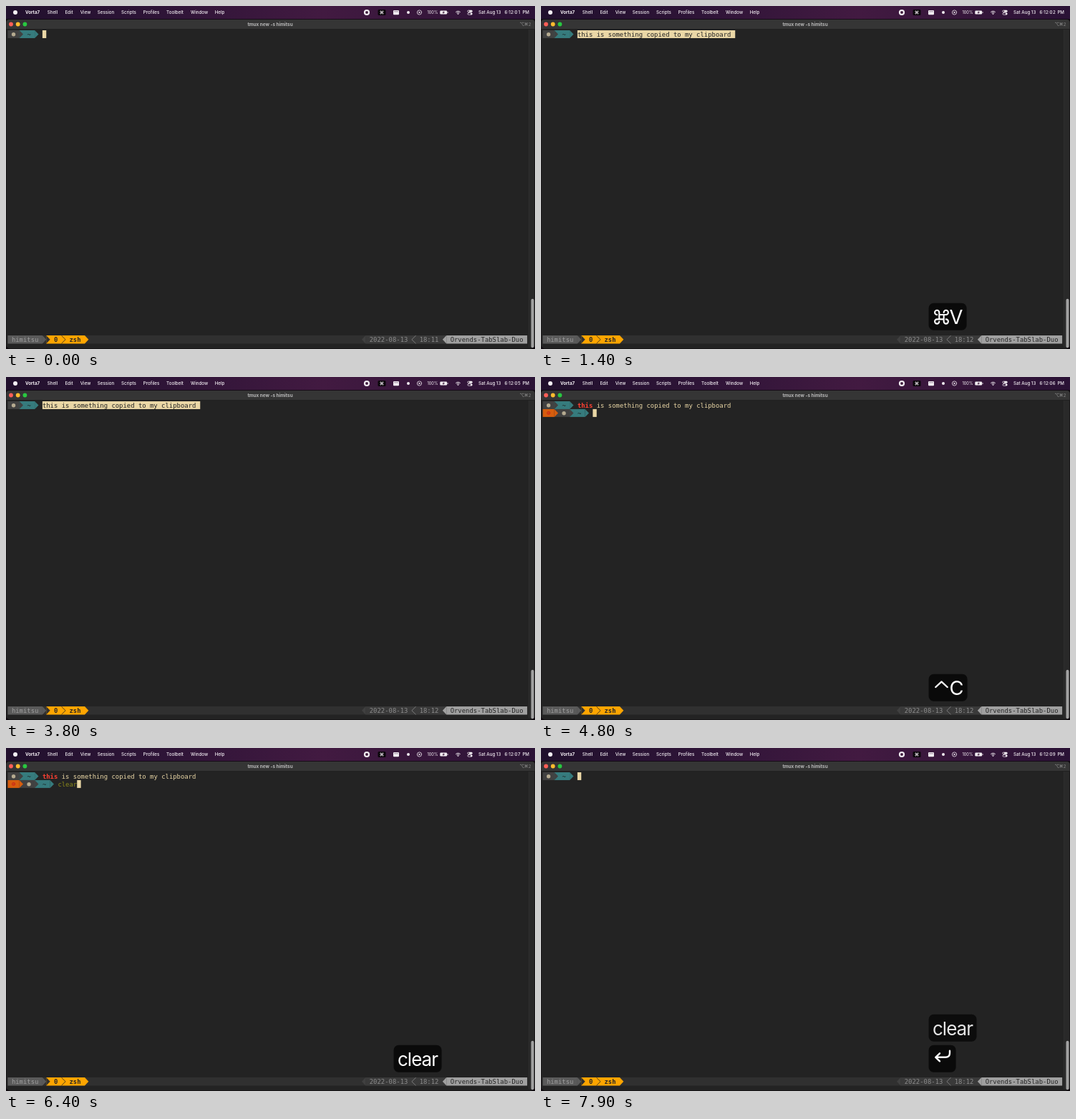
Recreate the animation shown at these times as an HTML page with a canvas. Size 739 by 480 pixels, loop 8 s.

```html
<!DOCTYPE html>
<html lang="en">
<head>
<meta charset="utf-8">
<title>Terminal paste</title>
<style>
html, body { margin: 0; width: 100%; height: 100%; overflow: hidden; background: #000; }
canvas { display: block; width: 739px; height: 480px; }
</style>
</head>
<body>
<canvas id="stage"></canvas>
<script>
const W = 739, H = 480, LOOP = 8000;
const canvas = document.getElementById('stage');
const ctx = canvas.getContext('2d');
const dpr = window.devicePixelRatio || 1;
canvas.width = W * dpr;
canvas.height = H * dpr;

const SANS = 'Inter, sans-serif';
const MONO = '8.928px "DejaVu Sans Mono", monospace';
const LEFT = 2.5, CELL = 5.375, ROW = 10.95, TOP = 34;
const STATUS = 461, STATUS_H = 11.5;
const CREAM = '#ead7a6', DARK = '#232323', GREY = '#414141', TEAL = '#367b7d';
const ORANGE = '#d65d0e', RED = '#ff4032', OLIVE = '#8a891a';
const AMBER = '#ffa500', BAR = '#303030';

const PASTE = 'this is something copied to my clipboard';
const PASTE_AT = 1400, CANCEL_AT = 4000, ENTER_AT = 7400;
const TYPE_AT = 5300, TYPE_STEP = 210, HOLD = 1740, FADE = 200;
const CMD = 'clear';

const keys = [
  { start: PASTE_AT, last: PASTE_AT, kind: 'cmd', text: 'V', width: 53 },
  { start: CANCEL_AT, last: CANCEL_AT, kind: 'ctrl', text: 'C', width: 54 },
  { start: TYPE_AT, last: TYPE_AT + 4 * TYPE_STEP, kind: 'typed' },
  { start: ENTER_AT, last: ENTER_AT, kind: 'enter', width: 38 }
];
const menu = [['Shell', 65], ['Edit', 88], ['View', 111], ['Session', 139.5], ['Scripts', 171.5],
  ['Profiles', 203], ['Toolbelt', 236], ['Window', 270], ['Help', 298.5]];

const col = n => LEFT + n * CELL;

function rect(x, y, w, h, fill) {
  ctx.fillStyle = fill;
  ctx.fillRect(x, y, w, h);
}

function round(x, y, w, h, r, fill) {
  ctx.fillStyle = fill;
  ctx.beginPath();
  ctx.roundRect(x, y, w, h, r);
  ctx.fill();
}

function disc(x, y, r, fill) {
  ctx.fillStyle = fill;
  ctx.beginPath();
  ctx.arc(x, y, r, 0, 7);
  ctx.fill();
}

function poly(points, fill) {
  ctx.fillStyle = fill;
  ctx.beginPath();
  points.forEach(p => ctx.lineTo(p[0], p[1]));
  ctx.fill();
}

function line(points, color, width) {
  ctx.strokeStyle = color;
  ctx.lineWidth = width;
  ctx.beginPath();
  points.forEach(p => ctx.lineTo(p[0], p[1]));
  ctx.stroke();
}

function label(str, x, y, font, fill, align = 'left') {
  ctx.font = font;
  ctx.fillStyle = fill;
  ctx.textAlign = align;
  ctx.fillText(str, x, y);
}

function mono(str, n, y, fill, bold) {
  label(str, col(n), y, (bold ? 'bold ' : '') + MONO, fill);
}

// Powerline arrow filling one cell; dir is 1 for right, -1 for left.
function arrow(n, y, h, fill, dir = 1) {
  const a = col(dir > 0 ? n : n + 1), b = a + dir * CELL;
  poly([[a, y], [b, y + h / 2], [a, y + h]], fill);
}

function chevron(n, color, dir) {
  const a = col(dir > 0 ? n : n + 1), b = a + dir * CELL;
  line([[a, STATUS + .5], [b, STATUS + STATUS_H / 2], [a, STATUS + STATUS_H - .5]], color, .8);
}

function looped(x, y, s, color, width) {
  const a = s * .34, r = s * .33, P = Math.PI;
  ctx.strokeStyle = color;
  ctx.lineWidth = width;
  ctx.beginPath();
  ctx.rect(x - a, y - a, 2 * a, 2 * a);
  for (const [sx, sy, from] of [[-1, -1, .5], [1, -1, 1], [1, 1, 1.5], [-1, 1, 0]]) {
    const cx = x + sx * (a + r), cy = y + sy * (a + r), f = from * P;
    ctx.moveTo(cx + r * Math.cos(f), cy + r * Math.sin(f));
    ctx.arc(cx, cy, r, f, f + 1.5 * P);
    ctx.lineTo(x + sx * a, y + sy * a);
  }
  ctx.stroke();
}

function menuIcons() {
  const w = '#f2edf2', bg = '#3a1838';
  disc(504, 9, 4.1, w);
  round(502.3, 7.3, 3.4, 3.4, 1, bg);
  round(519.5, 5, 11, 8, 1.5, '#0b060b');
  looped(525, 9, 2.2, w, .7);
  round(541, 6, 8, 6.2, 1, w);
  rect(542, 7.4, 6, .8, '#8a738a');
  disc(562, 9, 2, w);
  ctx.strokeStyle = w;
  ctx.lineWidth = .8;
  ctx.beginPath();
  ctx.arc(577.5, 9, 3.1, 0, 7);
  ctx.stroke();
  poly([[576.6, 7.5], [579.2, 9], [576.6, 10.5]], w);
  label('100%', 603.5, 11, '5.7px ' + SANS, w, 'right');
  round(606.3, 6.5, 9.8, 5, 1.2, w);
  rect(616.6, 8, .8, 2, w);
  poly([[611.8, 6.9], [609.3, 9.4], [611, 9.4], [610.5, 11.2], [613.1, 8.6], [611.3, 8.6]], bg);
  ctx.lineWidth = 1;
  for (const r of [2.4, 4.2]) {
    ctx.beginPath();
    ctx.arc(631.5, 11.3, r, -2.35, -.79);
    ctx.stroke();
  }
  disc(631.5, 11.1, .9, w);
  round(644.6, 5.8, 7, 2.9, 1.4, w);
  disc(646.2, 7.25, .9, bg);
  ctx.lineWidth = .7;
  ctx.beginPath();
  ctx.roundRect(644.9, 9.6, 6.4, 2.6, 1.3);
  ctx.stroke();
  disc(650, 10.9, 1.2, w);
}

function menuBar(t) {
  const g = ctx.createLinearGradient(0, 0, W, 0);
  g.addColorStop(0, '#21102d');
  g.addColorStop(.3, '#2e1437');
  g.addColorStop(.6, '#421a41');
  g.addColorStop(1, '#2a1235');
  rect(0, 0, W, 18.2, g);
  const font = '500 6.2px ' + SANS, w = '#f5f0f5';
  disc(13, 9, 3, w);
  label('Vorta7', 37, 11.2, 'bold 6.2px ' + SANS, w, 'center');
  menu.forEach(([name, x]) => label(name, x, 11.2, font, w, 'center'));
  menuIcons();
  const sec = 1 + Math.floor((t + 200) / 1000);
  label('Sat Aug 13', 660, 11.2, font, w);
  label('6:12:0', 714.6, 11.2, font, w, 'right');
  label(sec, 716.8, 11.2, font, w, 'center');
  label('PM', 731, 11.2, font, w, 'right');
}

function frame() {
  round(.5, 19, W - 1, 460.5, [4, 4, 5, 5], DARK);
  round(.5, 19, W - 1, 13.6, [4, 4, 0, 0], '#353535');
  rect(.5, 32.2, W - 1, .6, '#1a1a1a');
  rect(730.5, 33, 7.5, 444, '#292929');
  rect(730.2, 33, .6, 444, '#353535');
  round(733.5, 409.8, 4, 68.5, 2, '#a2a2a2');
  disc(7, 25.5, 2.9, '#ff5f57');
  disc(16.7, 25.5, 2.9, '#febc2e');
  disc(26.4, 25.5, 2.9, '#28c840');
  label('tmux new -s himitsu', 369, 27.6, 'bold 6.4px ' + SANS, '#b8b8b8', 'center');
  line([[718, 23.3], [720, 23.3], [722, 27.4], [723.4, 27.4]], '#858585', .7);
  line([[721, 23.3], [723.4, 23.3]], '#858585', .7);
  looped(726.7, 25.3, 1.9, '#858585', .65);
  label('2', 733.6, 27.6, '6.2px ' + SANS, '#858585', 'right');
}

function prompt(row, failed) {
  const y = TOP + row * ROW, h = ROW;
  const n = failed ? 4 : 0;
  rect(col(n), y, 3 * CELL, h, GREY);
  if (failed) {
    rect(col(3), y, CELL, h, GREY);
    rect(col(0), y, 3 * CELL, h, ORANGE);
    arrow(3, y, h, ORANGE);
    ctx.strokeStyle = '#c9201c';
    ctx.lineWidth = 1;
    ctx.beginPath();
    ctx.arc(col(1.5), y + h / 2, 2, 0, 7);
    ctx.stroke();
    disc(col(1.5), y + h / 2, .8, '#c9201c');
  }
  rect(col(n + 3), y, 4 * CELL, h, TEAL);
  arrow(n + 3, y, h, GREY);
  arrow(n + 7, y, h, TEAL);
  disc(col(n + 1.5), y + h / 2 + .3, 2.7, '#b5aa90');
  mono('~', n + 5, y + 8.8, '#1f2a2a');
}

function cursor(row, n) {
  rect(col(n), TOP + row * ROW, CELL, ROW, CREAM);
}

function terminal(t) {
  const base = TOP + 8.8;
  prompt(0, false);
  if (t < PASTE_AT || t >= ENTER_AT) {
    cursor(0, 9);
  } else if (t < CANCEL_AT) {
    rect(col(9), TOP, (PASTE.length + 1) * CELL, ROW, CREAM);
    mono(PASTE, 9, base, DARK);
  } else {
    mono('this', 9, base, RED, true);
    mono(PASTE.slice(5), 14, base, CREAM);
    prompt(1, true);
    const cmd = typed(t), whole = cmd === CMD;
    mono(cmd, 13, base + ROW, whole ? OLIVE : RED, !whole);
    cursor(1, 13 + cmd.length);
  }
}

function typed(t) {
  return CMD.slice(0, Math.max(0, Math.floor((t - TYPE_AT) / TYPE_STEP) + 1));
}

function statusBar(t) {
  const y = STATUS, h = STATUS_H, base = y + 9.1;
  rect(col(0), y, 135 * CELL, h, BAR);
  rect(col(0), y, 9 * CELL, h, '#5a5a5a');
  arrow(9, y, h, '#5a5a5a');
  mono('himitsu', 1, base, '#a0a0a0');
  rect(col(10), y, 10 * CELL, h, AMBER);
  arrow(10, y, h, BAR);
  arrow(20, y, h, AMBER);
  mono('0', 12, base, '#262626', true);
  chevron(14, '#262626', 1);
  mono('zsh', 16, base, '#262626', true);

  arrow(92, y, h, '#404040', -1);
  rect(col(93), y, 21 * CELL, h, '#3a3a3a');
  mono('2022-08-13', 94, base, '#8c8c8c');
  chevron(105, '#8c8c8c', -1);
  mono(t < 400 ? '18:11' : '18:12', 107, base, '#8c8c8c');
  arrow(113, y, h, '#a0a0a0', -1);
  rect(col(114), y, 21 * CELL, h, '#a0a0a0');
  mono('Orvends-TabSlab-Duo', 115, base, '#262626');
}

function bezel(key, t, y) {
  const font = '26px ' + SANS, w = '#fff';
  const str = key.kind === 'typed' ? typed(t) : key.text;
  ctx.letterSpacing = '-1px';
  ctx.font = font;
  const width = key.width || ctx.measureText(str).width + 11;
  round(541.6, y, width, 38, 7, '#0a0a0a');
  if (key.kind === 'typed') label(str, 547, y + 29, font, w);
  if (key.text) label(key.text, 570.5, y + 29.2, '27.5px ' + SANS, w);
  ctx.letterSpacing = '0px';
  if (key.kind === 'cmd') looped(559.5, y + 19.4, 9.4, w, 2.1);
  if (key.kind === 'ctrl') line([[551.3, y + 18.2], [559.5, y + 10.6], [567.7, y + 18.2]], w, 2.3);
  if (key.kind === 'enter') {
    ctx.strokeStyle = w;
    ctx.lineWidth = 2.4;
    ctx.beginPath();
    ctx.moveTo(571, y + 8);
    ctx.lineTo(571, y + 11.2);
    ctx.quadraticCurveTo(571, y + 17, 565, y + 17);
    ctx.lineTo(551.5, y + 17);
    ctx.moveTo(557, y + 11.5);
    ctx.lineTo(551.3, y + 17);
    ctx.lineTo(557, y + 22.5);
    ctx.stroke();
  }
}

function keyOverlay(t) {
  const shown = keys.filter(k => t >= k.start && t < k.last + HOLD + FADE);
  shown.forEach((key, i) => {
    ctx.globalAlpha = Math.min(1, 1 - (t - key.last - HOLD) / FADE);
    bezel(key, t, 415.8 - 43 * (shown.length - 1 - i));
  });
  ctx.globalAlpha = 1;
}

function draw() {
  const t = performance.now() % LOOP;
  ctx.setTransform(dpr, 0, 0, dpr, 0, 0);
  ctx.lineCap = ctx.lineJoin = 'round';
  rect(0, 0, W, H, '#0d080d');
  menuBar(t);
  frame();
  terminal(t);
  statusBar(t);
  keyOverlay(t);
  requestAnimationFrame(draw);
}
draw();
</script>
</body>
</html>
```
